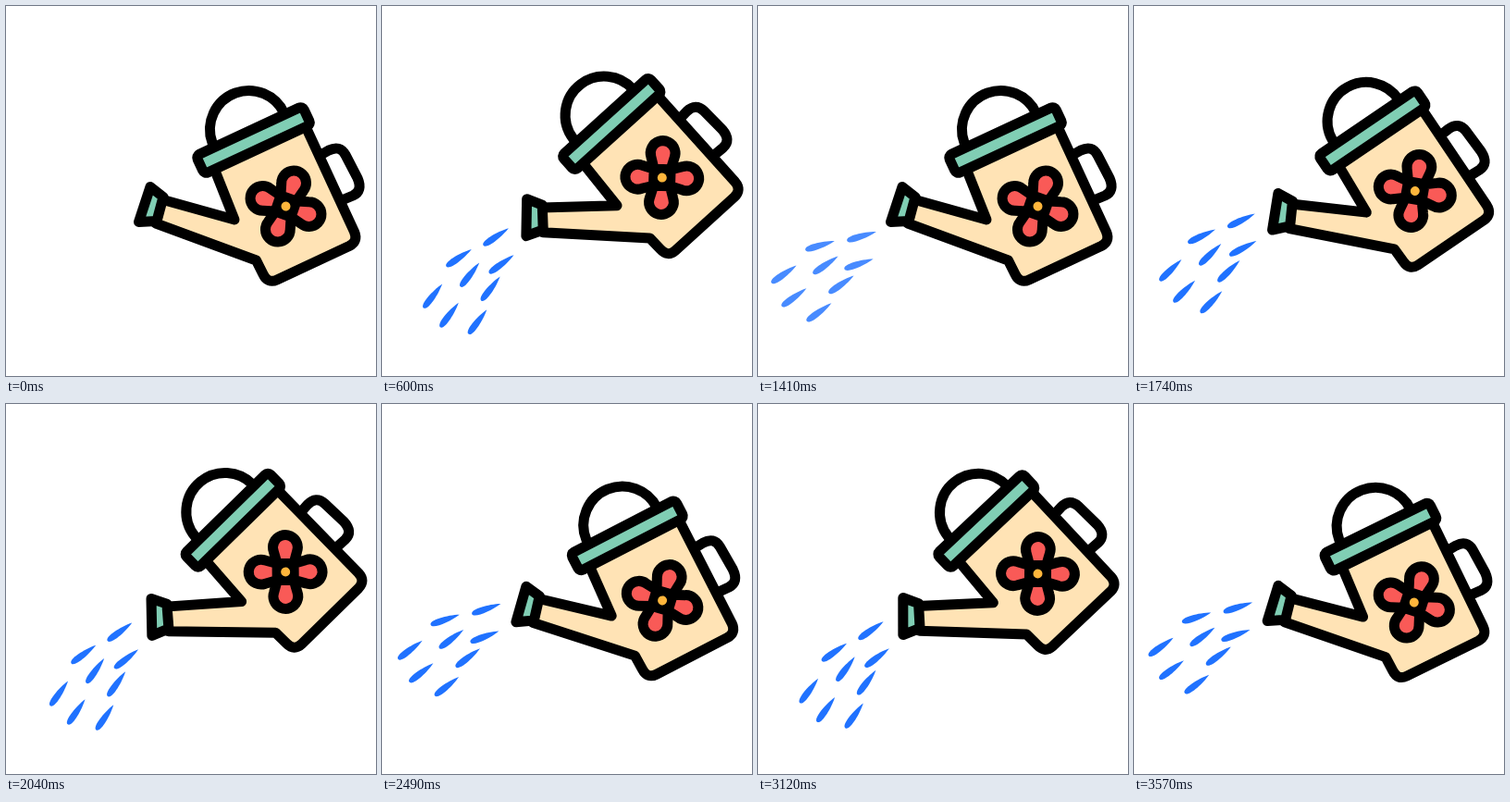
An HTML page with a canvas that plays this animation: 400 px wide and 400 px high, repeating every 3600 ms.

```html
<!DOCTYPE html>
<html lang="en">
<head>
<meta charset="utf-8">
<title>Watering can</title>
<style>
  html, body { margin: 0; width: 100%; height: 100%; overflow: hidden; background: #fff; }
  canvas { display: block; width: 400px; height: 400px; }
</style>
</head>
<body>
<canvas id="stage" width="400" height="400"></canvas>
<script>
const ctx = document.getElementById('stage').getContext('2d');

const LOOP = 3600, POUR = 1050, SECOND_START = 1500;
const TILT = 20, FALL = 34.5;
const COLOR = {
  line: '#000', cream: '#ffe3b5', teal: '#80ceb4',
  red: '#f95a57', gold: '#ffb63c', water: '#2072ff'
};

// x, y and slope in degrees of each drop, relative to the resting can
const DROPS = [
  [112, 218, -17], [67, 228, -17], [28, 259, -35], [73, 249, -35],
  [109, 248, -19], [39, 284, -36], [90, 270, -35], [66, 300, -36]
];

const rad = deg => deg * Math.PI / 180;
const clamp = v => Math.max(0, Math.min(1, v));

function at(x, y, deg, draw) {
  ctx.save();
  ctx.translate(x, y);
  ctx.rotate(rad(deg));
  draw();
  ctx.restore();
}

function outline(path, fill) {
  if (fill) {
    ctx.fillStyle = fill;
    ctx.fill(path);
  }
  ctx.stroke(path);
}

function disc(r, fill) {
  ctx.fillStyle = fill;
  ctx.beginPath();
  ctx.arc(0, 0, r, 0, 2 * Math.PI);
  ctx.fill();
}

const hoop = new Path2D();
hoop.arc(262.5, 133.5, 42, rad(160), rad(335));
const grip = new Path2D('M340 161L349 156Q361 150 367 161L380 186Q386 200 375 205L363 210');
const body = new Path2D('M224 173L247 231L168 209L162 235L270.5 275L278 290' +
  'Q283 300.5 293 296L371 259.5Q381 254.5 376.5 244L321 124Z');
const nozzle = new Path2D('M156 195.5L170 206.5L163 232.5L143.5 233.5Z');
const rim = new Path2D();
rim.roundRect(-63.5, -10.8, 127, 21.6, 4);
const petal = new Path2D();
petal.moveTo(-9, -9);
petal.arc(0, -26.5, 13.4, rad(160), rad(20));
petal.lineTo(9, -9);
petal.closePath();
const drop = new Path2D('M16.5 0C4 -4 -16.5 -5.5 -16.5 0C-16.5 5.5 4 4 16.5 0Z');

function drawCan() {
  ctx.strokeStyle = COLOR.line;
  ctx.lineWidth = 11;
  ctx.lineJoin = 'round';
  ctx.lineCap = 'round';
  outline(hoop);
  outline(grip);
  outline(body, COLOR.cream);
  outline(nozzle, COLOR.teal);
  at(267.5, 145, -25, () => outline(rim, COLOR.teal));
  at(302.5, 216.5, 19, () => {
    for (let i = 0; i < 4; i++) at(0, 0, i * 90, () => outline(petal, COLOR.red));
    disc(11, COLOR.line);
    disc(5, COLOR.gold);
  });
}

function drawDrops(offset, alpha) {
  ctx.globalAlpha = alpha;
  ctx.fillStyle = COLOR.water;
  for (const [x, y, deg] of DROPS) at(x, y + offset, deg, () => ctx.fill(drop));
  ctx.globalAlpha = 1;
}

// Linear swing down and back over one pour
function swing(t) {
  return -TILT * (1 - Math.abs(2 * t / POUR - 1));
}

function render(t) {
  const first = t < SECOND_START;
  const local = first ? t : t - SECOND_START;
  const angle = first ? swing(Math.min(t, POUR)) : swing(local % POUR);
  const offset = first ? FALL * (t / SECOND_START) ** 1.8 : 0;
  const fadeIn = clamp((local - 50) / 100);
  const fadeOut = first ? clamp((SECOND_START - t) / 110) : 1;

  ctx.fillStyle = '#fff';
  ctx.fillRect(0, 0, 400, 400);
  at(200, 200, angle, () => {
    ctx.translate(-200, -200);
    drawCan();
    drawDrops(offset, fadeIn * fadeOut);
  });
}

let start;
function tick(now) {
  start ??= now;
  render(Math.max(0, now - start) % LOOP);
  requestAnimationFrame(tick);
}
render(0);
requestAnimationFrame(tick);
</script>
</body>
</html>
```
